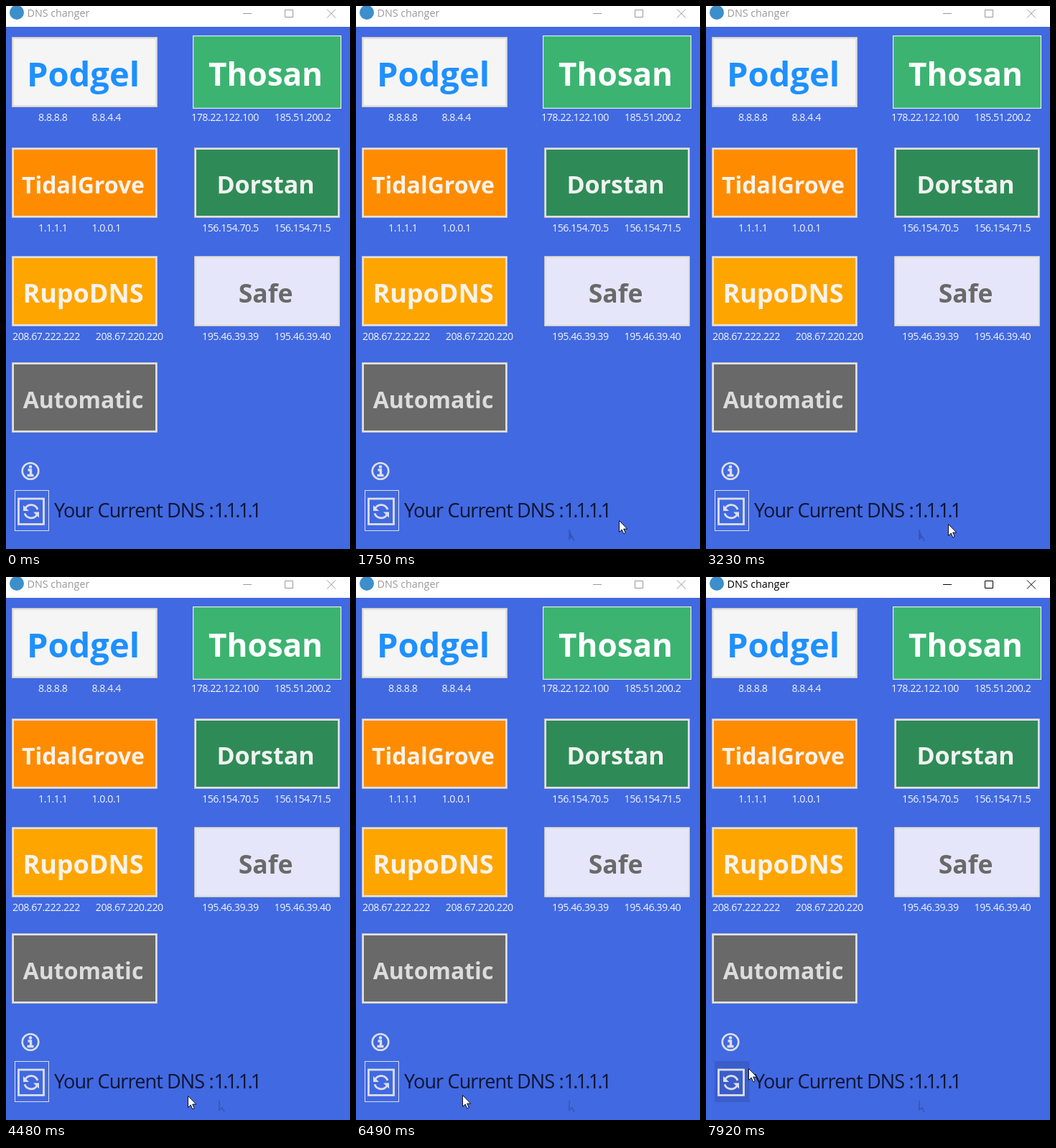
An HTML page that plays this animation: 479x756 px, repeating every 8 s.

```html
<!DOCTYPE html>
<html lang="en">
<head>
<meta charset="utf-8">
<title>DNS changer</title>
<style>
  html, body { margin: 0; width: 100%; height: 100%; overflow: hidden; background: #4169e1; }
  svg { display: block; width: 479px; height: 756px; font-family: "Open Sans", "Noto Sans", sans-serif; }
  .name { font-weight: 700; text-anchor: middle; }
  .ip { font-size: 14.2px; letter-spacing: -.48px; fill: #f2f5fd; }
  .status { font-size: 27px; fill: #0d1433; }
  .line { fill: none; stroke: #dcdfe8; }
  .solid { fill: #dcdfe8; stroke: none; }
</style>
</head>
<body>
<svg viewBox="0 0 479 756">
  <rect width="479" height="756" fill="#4169e1"/>
  <rect width="479" height="29" fill="#fff"/>
  <circle cx="15" cy="9" r="10" fill="#3c8fca"/>
  <g id="bar">
    <text x="29.5" y="15" font-size="14.3" fill="currentColor">DNS changer</text>
    <path d="M330 10.5h12M388.5 5.5h11v10h-11zM447 4.5l12 12M459 4.5l-12 12" fill="none" stroke="currentColor"/>
  </g>
  <g id="panel"></g>

  <g class="line" stroke-width="2.6">
    <circle cx="34" cy="647.5" r="11.3"/>
    <path d="M30.5 646h4v8M29.5 653.5h9" stroke-width="3.4"/>
    <circle class="solid" cx="34" cy="641.5" r="2.3"/>
  </g>

  <rect id="hover" x="12" y="674" width="48.5" height="57" fill="#3a5dc9"/>
  <rect id="focus" class="line" x="12.5" y="674.5" width="47" height="56"/>
  <g class="line" stroke-width="2.8">
    <rect x="17.5" y="686" width="35" height="35.5"/>
    <g id="arrow">
      <path d="M44 701A9.5 9.5 0 0 0 27 699"/>
      <path class="solid" d="M24 695v8h8z"/>
    </g>
    <use href="#arrow" transform="rotate(180 35 703.7)"/>
  </g>

  <text class="status" x="67" y="712" letter-spacing="-.85">Your Current DNS :</text>
  <text class="status" x="289.5" y="712" letter-spacing="-2.75">1.1.1.1</text>

  <path id="trace" d="M297 729v13l4-3 3 6" stroke="#3456b4" stroke-width="1.5"/>
  <path id="cursor" d="M.5.5v16l3.7-3.5 2.5 5.8 2.5-1.1-2.5-5.6h5z" fill="#fff" stroke="#111" stroke-linejoin="round"/>
</svg>
<script>
const $ = id => document.getElementById(id);
const LOOP = 8000, ACTIVE = 7360;

// Two columns, filled row by row
const servers = [
  { name: 'Podgel', fill: '#f5f5f5', ink: '#1e90ff', size: 47, indent: 37, ips: ['8.8.8.8', '8.8.4.4'] },
  { name: 'Thosan', fill: '#3cb371', ink: '#fff', size: 44, indent: -4, ips: ['178.22.122.100', '185.51.200.2'], focused: true },
  { name: 'TidalGrove', fill: '#ff8c00', ink: '#f7f3ec', size: 32, indent: 37, ips: ['1.1.1.1', '1.0.0.1'] },
  { name: 'Dorstan', fill: '#2e8b57', ink: '#f0f2f0', size: 34, indent: 11, ips: ['156.154.70.5', '156.154.71.5'] },
  { name: 'RupoDNS', fill: '#ffa500', ink: '#f7f3ec', size: 36, indent: 1, ips: ['208.67.222.222', '208.67.220.220'] },
  { name: 'Safe', fill: '#e6e6fa', ink: '#696969', size: 35.5, indent: 11, ips: ['195.46.39.39', '195.46.39.40'] },
  { name: 'Automatic', fill: '#696969', ink: '#dcdcdc', size: 32, indent: 0, ips: [] }
];

function box(x, y, inset, fill) {
  return `<rect x="${x + inset}" y="${y + inset}" width="${203 - 2 * inset}" height="${98 - 2 * inset}" fill="${fill}"/>`;
}

function frame(x, y, s) {
  return s.focused
    ? box(x, y, -2, '#e4efe9') + box(x, y, -.8, s.fill)
    : box(x, y, 0, '#b4b4b4') + box(x, y, .7, '#e1e1e1') + box(x, y, 3, s.fill);
}

function button(s, i) {
  const x = 8 + 254 * (i % 2), row = i >> 1;
  const y = 43 + 156 * row - 1.7 * row * row;
  const top = Math.round(y);
  const ips = s.ips.join(`<tspan dx="${s.indent > 30 ? 34 : 22}"></tspan>`);
  const [first, second] = s.ips;
  const gap = s.indent > 30 ? 34 : 22;
  const addresses = first
    ? `<text class="ip" x="${x + s.indent}" y="${top + 117}">${first}<tspan dx="${gap}">${second}</tspan></text>`
    : '';
  return frame(x, top, s) + addresses
    + `<text class="name" x="${x + 99.5}" y="${top + 52 + s.size * .36}" font-size="${s.size}" fill="${s.ink}">${s.name}</text>`;
}
$('panel').innerHTML = servers.map(button).join('');

// Turning points of the pointer: time, x, y
const turns = [
  [420, 387, 750], [1120, 282, 729], [1750, 366, 716], [2200, 399, 720],
  [2500, 320, 720], [2900, 408, 720], [3230, 337, 721], [3850, 389, 721],
  [4480, 253, 722], [4750, 265, 734], [5370, 196, 724], [6100, 141, 732],
  [6490, 148, 721], [7100, 51, 695], [7780, 51, 695], [7920, 59, 684]
];

function pointAt(t) {
  const next = turns.findIndex(p => p[0] > t);
  if (next < 0) return turns[turns.length - 1].slice(1);
  const [t0, x0, y0] = turns[next - 1], [t1, x1, y1] = turns[next];
  const k = (1 - Math.cos(Math.PI * (t - t0) / (t1 - t0))) / 2;
  return [Math.round(x0 + (x1 - x0) * k), Math.round(y0 + (y1 - y0) * k)];
}

const show = (id, on) => $(id).setAttribute('visibility', on ? 'visible' : 'hidden');

function draw() {
  const t = performance.now() % LOOP;
  const inside = t >= turns[0][0];
  show('cursor', inside);
  if (inside) $('cursor').setAttribute('transform', `translate(${pointAt(t)})`);
  show('trace', t >= 1440);
  $('trace').setAttribute('fill', t < 3760 ? '#3456b4' : 'none');
  show('hover', t >= 7080);
  show('focus', t < ACTIVE);
  $('bar').setAttribute('color', t < ACTIVE ? '#999' : '#000');
  requestAnimationFrame(draw);
}
draw();
</script>
</body>
</html>
```
